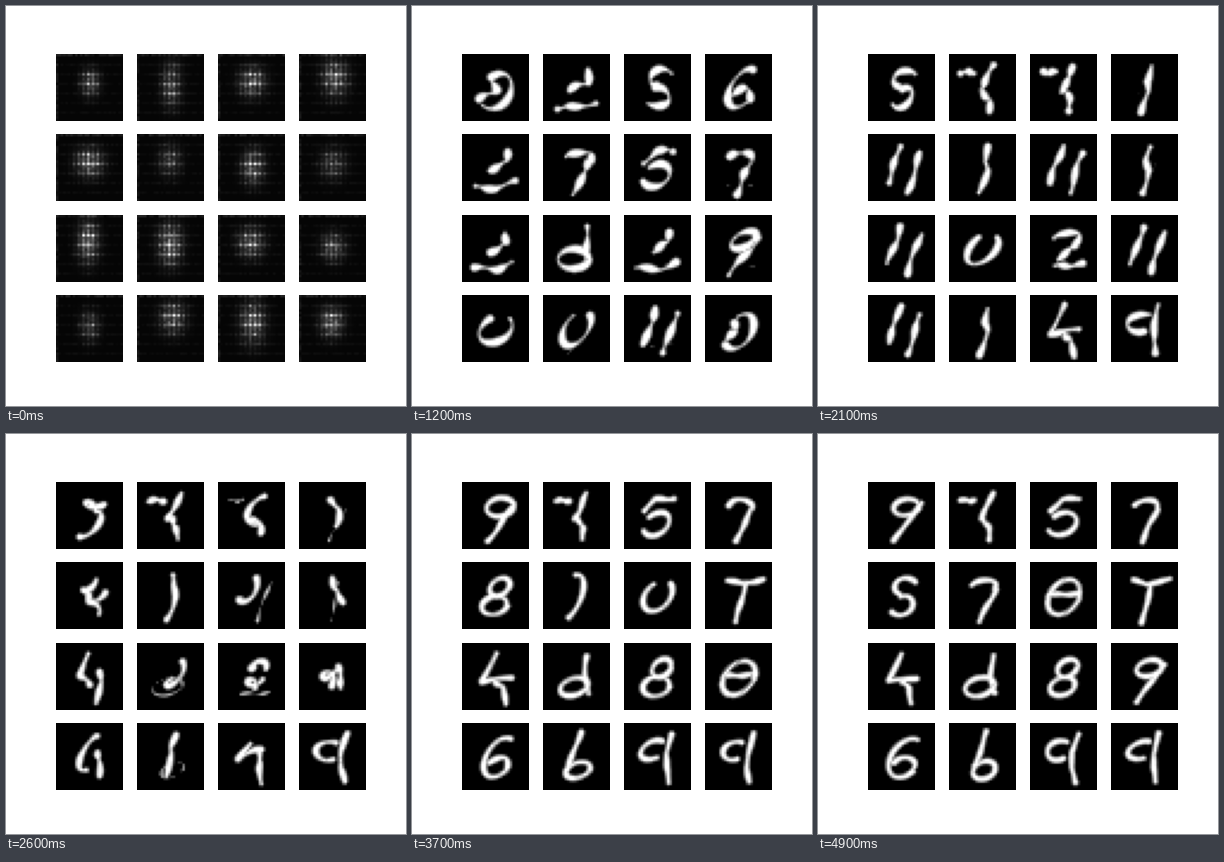
Animation of 400x400 px, one loop 5000 ms. Source, as a matplotlib script:

```python
import numpy as np
import matplotlib.pyplot as plt
from matplotlib.animation import FuncAnimation

FRAMES, INTERVAL = 50, 100
CELLS, SIDE = 28, 67.0        # cells per tile, tile side in drawing units
SAMPLES, SOFT = 36, 3.2       # points per stroke, edge softness
HIDDEN = -9.0                 # width added to strokes that are absent

centres = (np.arange(CELLS) + 0.5) * SIDE / CELLS
GX, GY = np.meshgrid(centres, centres)
ALONG = np.linspace(0, 1, SAMPLES)


def place(x, y):
    """Map the unit glyph box to a slanted box inside the tile."""
    return np.column_stack([34 + 14 * x - 8 * y, 35 + 22 * y])


def arc(x, y, rx, ry, start=0, end=360):
    angle = np.radians(start + (end - start) * ALONG)
    return place(x + rx * np.cos(angle), y + ry * np.sin(angle))


def line(*coords):
    pts = np.array(coords, float).reshape(-1, 2)
    length = np.r_[0, np.cumsum(np.hypot(*np.diff(pts, axis=0).T))]
    return place(*[np.interp(ALONG * length[-1], length, c) for c in pts.T])


GLYPHS = {
    "1": [line(-.15, -1, -.05, -.3, .3, .05, .4, 1.1)],
    "2": [arc(-.1, -.45, .85, .38, 190, 380), line(.7, -.3, -.1, .4), line(-.3, .75, 1.7, .65)],
    "3": [arc(0, .1, 1.05, .75, -120, 120), line(-.5, -.3, 0, 0, -.8, .5)],
    "4": [line(-.65, -1.1, -.95, .15, 1.1, 0), line(.1, .2, .8, .45, 1.3, 1.15)],
    "5": [line(.65, -.85, -.6, -.8, -1.1, -.3), arc(.05, .32, .95, .5, -140, 140)],
    "6": [arc(.25, 0, 1.05, .9, -70, -320), arc(.3, .4, .8, .4, -150, 0)],
    "7": [arc(-.2, -.35, .9, .45, 200, 360), line(.7, -.35, .4, 1.1)],
    "8": [arc(0, -.45, .7, .38), arc(.1, .38, .9, .45)],
    "9": [arc(.05, -.45, .9, .4), line(1, -.6, .4, .5, 0, 1.1)],
    "s": [arc(-.05, -.5, .75, .35, -40, -250), arc(.2, .4, .75, .42, -110, 130)],
    "e": [arc(0, 0, 1.05, .8), line(-.8, -.1, .8, -.15)],
    ")": [arc(-.7, .1, 1.05, 1.1, -90, 50)],
    "u": [arc(-.05, -.05, 1, .7, -50, 230)],
    "T": [line(-1.2, -.75, -.2, -.6, 1.3, -.8), line(.1, -.6, .45, 1.15)],
    "q": [arc(-.5, -.35, .85, .42, 60, 290), line(.4, -1.1, .5, -.2, .8, .4, 1.4, 1.1)],
    "d": [line(.15, -1, .5, -.1, 1.2, .7), arc(0, .4, 1, .4)],
    "b": [line(-.4, -1.2, -.4, .4), arc(.4, .55, .8, .38)],
    "i": [line(.1, -1.05, -.1, .1), line(.1, .1, .7, .5, 1, 1), line(-2, -.75, -1, -.75)],
    "=": [line(-.7, -1.05, -.65, .6), line(.9, -.75, 1, 1.05)],
    "z": [line(.25, -.85, .6, -.3, -.4, .05), line(-1, .85, .5, .85, 1.6, .6)],
}

# What the sixteen tiles resemble at each stage of training, row by row.
STAGES = {
    5: "2955" "2492" "4922" ")927",
    12: "3zs6" "z757" "zdz9" "uu=3",
    21: "sii1" "=1=1" "=u2=" "=14q",
    32: "9i67" "8)uT" "4d8e" "6bqq",
    37: "9i57" "8)uT" "4d8e" "6bqq",
    49: "9i57" "s7eT" "4d89" "6bqq",
}
EPOCHS = sorted(STAGES)


def lattice(tile):
    """The first epoch: a dim dotted glow."""
    rng = np.random.default_rng(tile)
    cx, cy = rng.normal((34, 29), (1, 2))
    sx, sy = rng.uniform((6, 9), (9, 15))
    row, col = np.mgrid[:CELLS, :CELLS]
    noise = rng.random((CELLS, CELLS))
    glow = np.exp(-((GX - cx) / sx) ** 2 / 2 - ((GY - cy) / sy) ** 2 / 2)
    grid = (.5 + .5 * (col % 2)) * (.45 + .55 * (row % 4 == 0))
    haze = .02 + noise * (.04 * (row % 4 == 0) + .1 * ((col == 0) | (row == 0)))
    return np.clip(rng.uniform(.5, 1.1) * glow * grid * (.6 + .8 * noise) + haze, 0, 1)


def blend(a, b, u):
    """Strokes between two glyphs; unmatched strokes thin out in place."""
    for k in range(max(len(a), len(b))):
        start, end = (g[k] if k < len(g) else None for g in (a, b))
        if start is None:
            yield HIDDEN * (1 - u), end
        elif end is None:
            yield HIDDEN * u, start
        else:
            yield 0, start + (end - start) * u


def paint(strokes, frame, tile):
    """Draw strokes that get steadier and more even as training goes on."""
    rough = (1 - frame / FRAMES) ** 2
    image = np.zeros((CELLS, CELLS))
    for k, (extra, pts) in enumerate(strokes):
        phase = 5 * ALONG + .9 * frame + 1.7 * k + 2.3 * tile
        drift = np.column_stack([np.sin(phase), np.cos(1.3 * phase)])
        pts = pts + (.7 + 1.5 * rough) * drift
        width = 5.3 + extra + (.8 + 4 * rough) * np.sin(1.9 * phase)
        gap = np.hypot(GX[..., None] - pts[:, 0], GY[..., None] - pts[:, 1])
        image = np.maximum(image, ((width / 2 - gap) / SOFT + .5).max(axis=-1))
    return np.clip(image, 0, 1)


LATTICES = [lattice(tile) for tile in range(16)]


def tile_image(tile, frame):
    first = EPOCHS[0]
    end = next(e for e in EPOCHS if e >= frame)
    start = max((e for e in EPOCHS if e < frame), default=first)
    u = (frame - start) / (end - start) if end > start else 1
    glyphs = [GLYPHS[STAGES[e][tile]] for e in (start, end)]
    drawn = paint(blend(*glyphs, u), frame, tile)
    learned = min(frame / first, 1)
    return (1 - learned) * LATTICES[tile] + learned * drawn


fig, axes = plt.subplots(4, 4, figsize=(4, 4), dpi=100)
fig.set_facecolor("white")
images = []
for ax in axes.flat:
    ax.axis("off")
    images.append(ax.imshow(np.zeros((CELLS, CELLS)), cmap="gray", vmin=0, vmax=1))


def update(frame):
    for tile, image in enumerate(images):
        image.set_data(tile_image(tile, frame))
    return images


anim = FuncAnimation(fig, update, frames=FRAMES, interval=INTERVAL,
                     init_func=lambda: update(0), repeat=True, repeat_delay=0)
plt.show()
```
